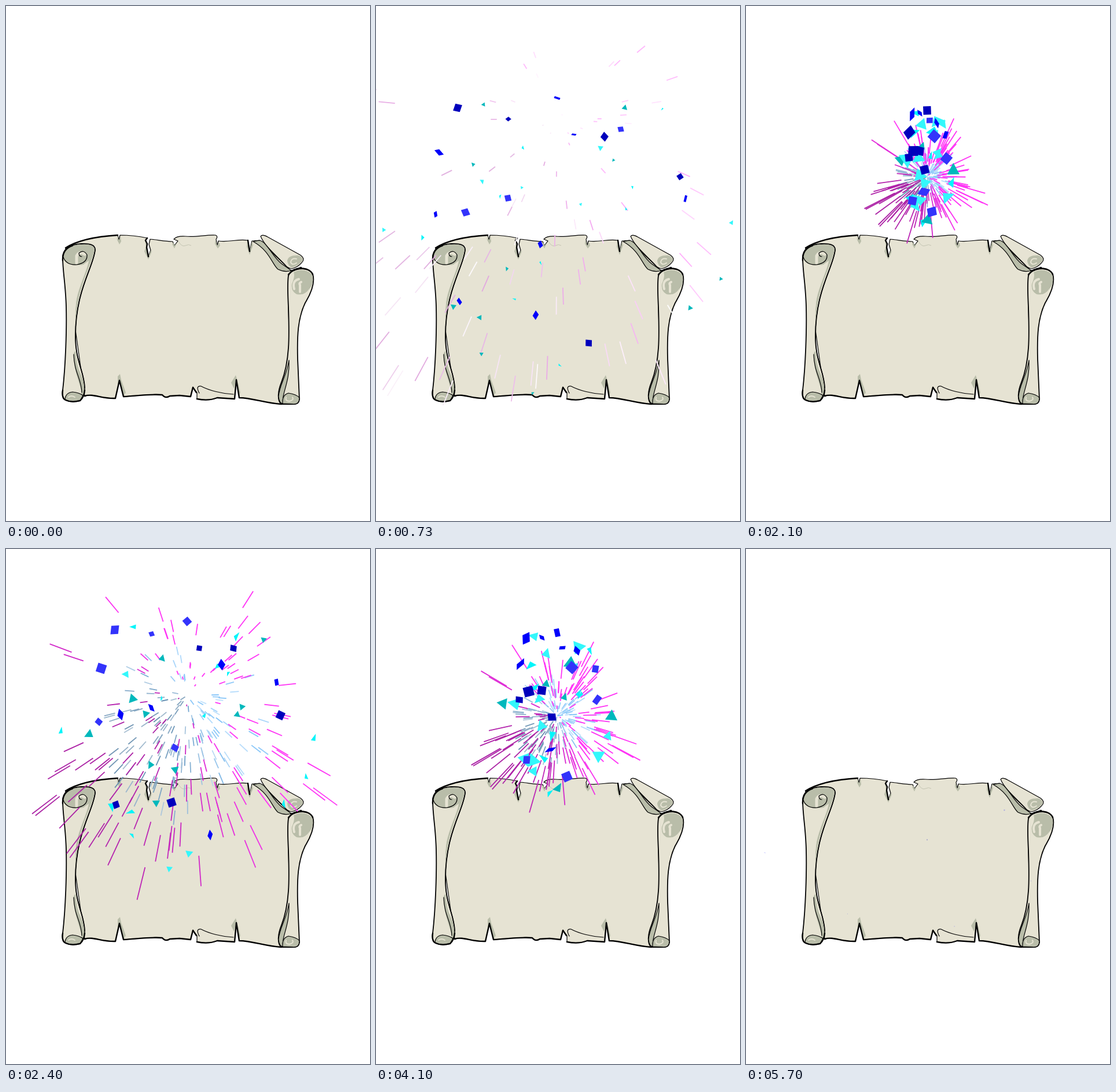
Recreate the animation shown at these times as an HTML page with a canvas. Size 629x890 px, loop 5730 ms.

```html
<!DOCTYPE html>
<html lang="en">
<head>
<meta charset="utf-8">
<title>Scroll with confetti</title>
<style>
  html, body { margin: 0; width: 100%; height: 100%; overflow: hidden; background: #fff; }
  svg, canvas { position: absolute; left: 0; top: 0; width: 629px; height: 890px; }
  .paper { fill: #e6e3d3; }
  .shade { fill: #b9bda9; }
  .line { fill: none; }
  .ink { stroke: #000; stroke-width: 1.8; stroke-linejoin: round; stroke-linecap: round; }
  .thin { stroke-width: 1.2; }
  .bold { stroke-width: 2.4; }
  .light { fill: none; stroke: #e6e3d3; stroke-linecap: round; }
</style>
</head>
<body>
<svg viewBox="0 0 629 890">
  <!-- sheet -->
  <path class="paper ink thin" d="M103 418C125 404 160 398 193 396L195 404L197 396C215 396 230 398 244 401L241 405L244 411L243 417L246 433L250 422L247 412L249 403C262 404 275 407 288 407L291 414L297 406L290 403Q295 397 310 398C330 400 345 395 362 396Q367 398 363 403L365 414L367 406C385 409 400 402 418 405L421 424L425 406L438 405L493 458L488 520L490 600L476 688C450 687 425 677 403 677L398 646L395 679L365 677Q350 683 330 679L330 668L323 659L319 675L300 673L283 674Q276 679 270 672C250 670 225 674 203 675L196 647L189 678C165 679 150 669 136 674L120 560Z"/>
  <path class="shade" d="M193 397L195 405L198 398L199 407L196 412L192 404ZM240 405L243 412L242 418L246 433L250 423L252 424L246 438L239 424L242 416ZM362 404L365 414L368 408L370 414L366 419L361 411ZM417 406L421 424L425 408L427 413L421 430L416 416ZM290 409L291 414L295 410L291 419L287 411ZM193 655V640L197 636L199 646L207 668L203 674L196 646ZM389 651L397 638L400 648L405 668L403 675L398 645L394 661Z"/>
  <path class="line" stroke="#c5c5b3" d="M298 407Q304 417 310 414T320 414"/>
  <path class="line ink bold" d="M103 418C125 404 160 398 193 396M244 401L241 405L244 411L243 417L246 433M418 405L421 424M136 674C150 669 165 679 189 678L196 647L203 675C225 674 250 670 270 672Q276 679 283 674L300 673L319 675L323 659L329 668M330 679Q350 683 365 677L395 679L398 646L403 677C425 677 450 687 476 688"/>
  <path class="line ink thin" d="M334 669Q327 656 337 657C350 664 372 670 393 671"/>
  <!-- folded corner -->
  <path class="shade ink thin" d="M427 407L438 405C452 408 460 434 477 446L493 457Q482 461 470 455C460 447 456 423 427 407Z"/>
  <path class="paper ink thin" d="M440 398Q443 394 452 399L508 430Q516 435 513 441Q506 451 494 454Q487 453 483 448C468 432 447 415 440 398Z"/>
  <path class="shade" d="M486 440Q488 430 505 431Q514 433 512 441Q505 449 494 452Q487 449 486 440Z"/>
  <path class="light" stroke-width="2" d="M502 437Q493 435 492 443Q495 449 502 444"/>
  <!-- right roll -->
  <path class="paper ink" d="M488 466C494 453 520 449 530 463C535 480 525 500 517 513C504 540 503 570 504 610L507 680Q506 688 498 688L476 688C468 682 470 665 476 650C492 610 489 560 488 520Q486 480 488 466Z"/>
  <path class="shade" d="M497 460Q514 451 528 463Q534 478 524 489Q516 501 502 498Q492 493 494 480Q500 467 497 460Z"/>
  <path class="light" stroke-width="4" d="M506 472Q494 475 498 489M510 477Q506 479 508 482V494"/>
  <path class="shade ink thin" d="M489 612C485 640 472 655 471 675Q472 687 479 687C475 672 491 650 489 612Z"/>
  <path class="shade ink thin" d="M478 687Q477 672 488 669Q502 671 507 677Q507 688 498 688Z"/>
  <path class="light" stroke-width="2" d="M484 676Q482 683 490 683Q498 681 495 676"/>
  <path class="line ink bold" d="M488 464Q500 449 520 455Q528 458 530 464M493 458L510 452"/>
  <!-- left roll -->
  <path class="paper ink" d="M98 435C98 420 110 412 130 411C145 410 154 413 154 421C152 450 120 490 120 570C120 615 135 630 136 660Q135 675 128 682Q112 686 101 680Q96 675 98 664C103 620 105 560 104 520C103 480 98 460 98 435Z"/>
  <path class="shade" d="M99 434C100 420 114 412 132 412Q151 411 153 420C150 445 122 485 120 550Q118 490 139 446Q119 451 105 444Q100 440 99 434ZM117 600C117 630 125 644 131 668L126 682L134 672Q138 655 129 636Q121 619 120 596Z"/>
  <path class="paper" d="M143 440C139 465 115 500 118 550L111 560L118 470L135 446Z"/>
  <path class="light" stroke-width="5" d="M122 432V444M122 432Q126 423 136 429"/>
  <path class="line ink thin" d="M99 434Q104 448 122 447Q141 444 140 430Q134 420 126 427Q126 433 131 433M154 421C152 450 120 490 120 570C120 615 135 630 136 660"/>
  <path class="line ink thin" d="M117 602C118 635 130 642 131 668"/>
  <path class="shade ink thin" d="M102 680Q103 668 115 667Q126 668 133 673L128 682Q114 686 102 680Z"/>
  <path class="light" stroke-width="2" d="M108 676Q113 672 119 676"/>
  <path class="line ink bold" d="M98 440Q97 420 115 414M98 664Q96 678 103 681Q113 686 128 682Q135 676 136 664"/>
</svg>
<canvas id="stage" width="629" height="890"></canvas>
<script>
const ctx = document.getElementById('stage').getContext('2d');
const LOOP = 5730, BURST = 24, OX = 313, OY = 300;

let seed = 41;
function rnd() {
  seed = seed + 0x6D2B79F5 | 0;
  let n = Math.imul(seed ^ seed >>> 15, 1 | seed);
  n = n + Math.imul(n ^ n >>> 7, 61 | n) ^ n;
  return ((n ^ n >>> 14) >>> 0) / 4294967296;
}
const range = (a, b) => a + (b - a) * rnd();
const clamp = v => Math.max(0, Math.min(1, v));
const many = (count, make) => Array.from({ length: count }, make);
const tint = (rgb, shade, white) =>
  `rgb(${rgb.map(c => Math.round(c * shade + (255 - c * shade) * white))})`;

// A piece is known by where it hangs at step 9; nearer pieces fall faster.
const piece = (x, y, near, size) => ({
  x, y, size,
  drift: .88 * (x - OX),
  fall: 37.5 * near,
  lift: 219 * near - .44 * (y - 237),
  turn: range(0, 6.3), spin: range(-.3, .3), flip: range(0, 6.3)
});
function scattered(sizeMin, sizeMax) {
  const a = range(0, 6.3), r = 320 * Math.sqrt(rnd()), near = range(.6, 1.3);
  return piece(OX + r * Math.cos(a), 237 + 130 * near + .85 * r * Math.sin(a), near, range(sizeMin, sizeMax));
}
const leaders = [[141, 176], [109, 253], [103, 360], [228, 332], [284, 412], [313, 159], [423, 213]];
const squares = [
  ...leaders.map(([x, y]) => piece(x, y, 1, range(9, 14))),
  ...many(9, () => scattered(7, 15))
];
const triangles = many(26, () => scattered(8, 15));

function streaks(count, slow, fast, lifeMin, lifeMax) {
  return many(count, () => {
    const z = range(-1, 1), a = range(0, 6.3);
    const v = range(slow, fast) * Math.sqrt(1 - z * z) / (1 - .15 * z);
    return { vx: v * Math.cos(a) - 1, vy: v * Math.sin(a) - 5, life: range(lifeMin, lifeMax), pale: rnd() };
  });
}
const pink = streaks(135, 14, 48, 8.1, 11);
const blue = streaks(140, 6, 26, 7, 7.9);

// Drag slows the drift while the piece falls at its own end speed.
function place(p, t) {
  const e = 1 - Math.exp(-.09 * (t - 9));
  const out = Math.pow(Math.min(1, t / 4), .6);
  return [
    OX + (p.x + p.drift * e - OX) * out,
    OY + (p.y + p.fall * (t - 9) - p.lift * e - OY) * out
  ];
}

function drawPieces(list, corners, rgb, t, scale) {
  for (const p of list) {
    const flip = Math.cos(p.flip + t * .6), size = p.size * scale / 2;
    ctx.fillStyle = tint(rgb, flip < -.5 ? .75 : 1, flip > .5 ? .2 : 0);
    ctx.save();
    ctx.translate(...place(p, t));
    ctx.rotate(p.turn + p.spin * t);
    ctx.scale(.3 + .7 * Math.abs(flip), 1);
    ctx.rotate(p.flip);
    ctx.beginPath();
    for (let i = 0; i < corners; i++) {
      const a = i * 2 * Math.PI / corners;
      ctx.lineTo(Math.cos(a) * size * 1.4, Math.sin(a) * size * 1.4);
    }
    ctx.fill();
    ctx.restore();
  }
}

function drawStreaks(list, t, look) {
  ctx.lineWidth = look.width;
  for (const s of list) {
    if (t >= s.life) continue;
    const dy = s.vy + 2.6 * t, v = Math.hypot(s.vx, dy) || 1;
    const x = OX + s.vx * t, y = OY + s.vy * t + 1.3 * t * t;
    const ux = s.vx / v, uy = dy / v, half = look.length(v, t) / 2;
    const shade = 1 - .33 * clamp(.6 * uy - .8 * ux);
    ctx.strokeStyle = tint(look.rgb, shade, look.white(s, t));
    ctx.beginPath();
    ctx.moveTo(x - ux * half, y - uy * half);
    ctx.lineTo(x + ux * half, y + uy * half);
    ctx.stroke();
  }
}
const pinkLook = {
  rgb: [255, 50, 245], width: 1.8,
  length: (v, t) => v * (1.4 - .06 * t),
  white: (s, t) => clamp((t - 6) / (s.life - 6))
};
const blueLook = {
  rgb: [130, 195, 248], width: 1.8,
  length: v => 9 + v * .45,
  white: s => s.pale * .5
};

function draw(t) {
  ctx.clearRect(0, 0, 629, 890);
  if (t === 0) return;
  ctx.save();
  ctx.beginPath();
  ctx.rect(0, 60, 629, 630);
  ctx.clip();
  drawStreaks(blue, t, blueLook);
  drawStreaks(pink, t, pinkLook);
  if (t < 13) drawPieces(triangles, 3, [0, 245, 250], t, (13 - t) / 7);
  ctx.globalAlpha = clamp((26 - t) / 10);
  drawPieces(squares, 4, [0, 0, 250], t, (26 - t) / 17);
  ctx.restore();
}

// 12.5 steps a second, shown on a 30 Hz clock
let shown = -1;
function tick() {
  const clock = Math.floor((performance.now() % LOOP + 5) * .03);
  const step = Math.floor(clock / 2.4 + 1e-6) % BURST;
  if (step !== shown) draw(shown = step);
  requestAnimationFrame(tick);
}
tick();
</script>
</body>
</html>
```
